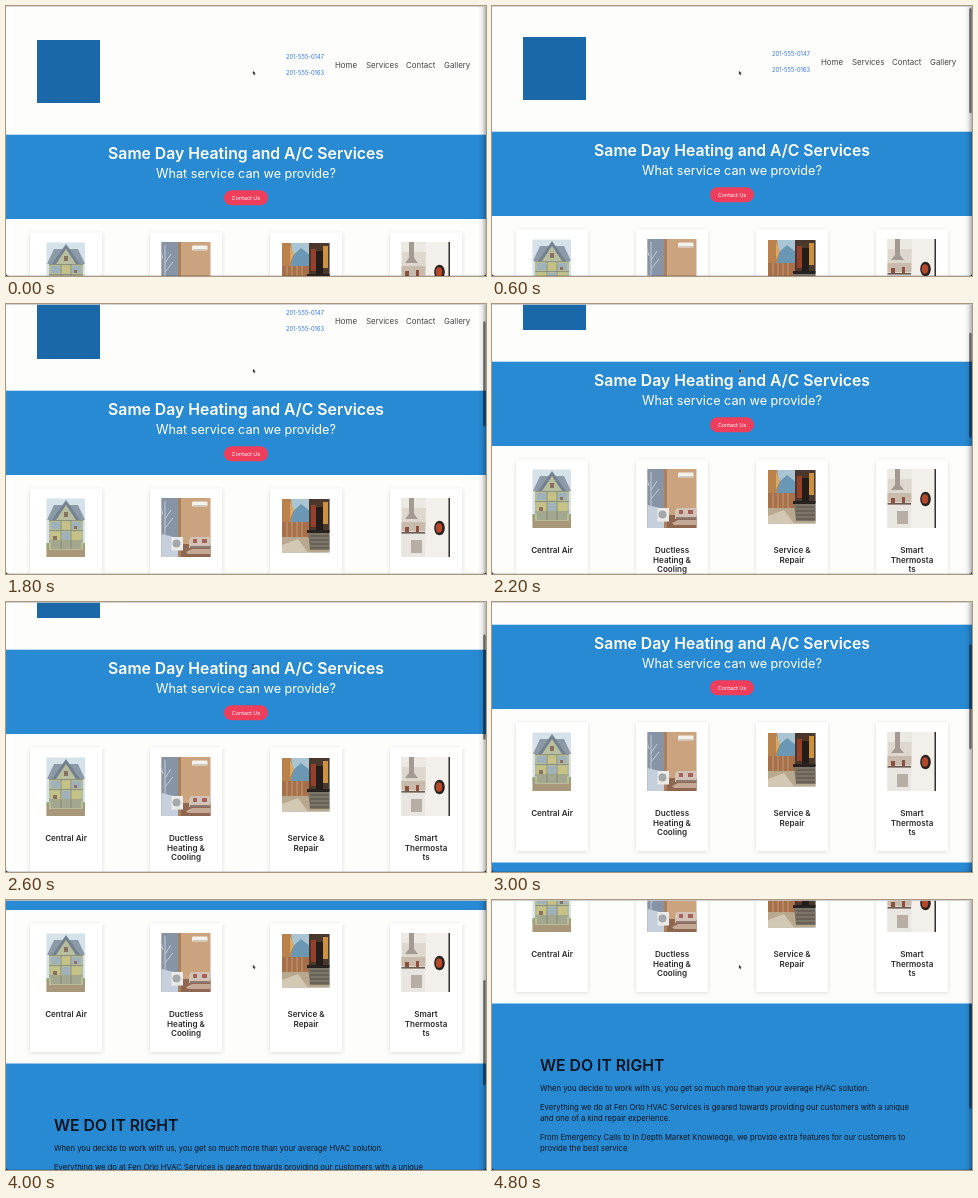
Animation, 480 px wide and 270 px high, one loop 5000 ms. Source, as an HTML page:

```html
<!DOCTYPE html>
<html lang="en">
<head>
<meta charset="utf-8">
<title>Heating and cooling page</title>
<style>
  html, body { margin: 0; width: 100%; height: 100%; overflow: hidden; background: #fdfdfc; }
  svg { display: block; width: 480px; height: 270px; font-family: Inter, Roboto, sans-serif; }
  .mid { text-anchor: middle; }
  .title { font-size: 15.75px; font-weight: 600; }
  .sub { font-size: 12.65px; }
  .phone { font-size: 5.75px; fill: #3273dc; }
  .nav { font-size: 7.9px; fill: #454545; }
  .btn { font-size: 5.4px; }
  .name { font-size: 8.1px; font-weight: 600; fill: #2b2b2b; }
  .copy { font-size: 7.66px; }
  .white { fill: #fff; }
  .ink { fill: #0b1420; }
  .card { fill: #fff; filter: drop-shadow(0 1.8px 2.2px rgba(10, 10, 10, .13)); }
</style>
</head>
<body>
<svg viewBox="0 0 480 270">
  <defs>
    <linearGradient id="edge">
      <stop offset="0" stop-color="#000" stop-opacity="0"/>
      <stop offset=".5" stop-color="#000" stop-opacity=".06"/>
      <stop offset="1" stop-color="#000" stop-opacity=".3"/>
    </linearGradient>
  </defs>
  <rect width="480" height="270" fill="#fdfdfc"/>
  <g id="page">
    <rect x="31" y="34" width="63" height="63" fill="#1a68a8"/>
    <text class="phone" x="280" y="53">201-555-0147</text>
    <text class="phone" x="280" y="69">201-555-0163</text>
    <g id="nav"></g>

    <rect y="128.700" width="480" height="84.300" fill="#288ad3"/>
    <text class="title mid white" x="240" y="153.300">Same Day Heating and A/C Services</text>
    <text class="sub mid white" x="240" y="172">What service can we provide?</text>
    <rect x="218" y="184.300" width="44" height="15" rx="7.500" fill="#ee3e5c"/>
    <text class="btn mid white" x="240" y="193.700">Contact Us</text>

    <g id="cards"></g>

    <!-- house cutaway -->
    <g>
      <rect x="40.500" y="236.500" width="38.500" height="58.500" fill="#d5e2ea"/>
      <path d="M40.500 283H79v12H40.500z" fill="#a9977a"/>
      <path d="M40.500 281H79v4H40.500z" fill="#94a878"/>
      <path d="M43 257h34v31H43z" fill="#b9bd97"/>
      <path d="M41 258l7-15h24l7 15z" fill="#8c99a6"/>
      <path d="M46 258l14-20 14 20z" fill="#74818f"/>
      <path d="M50 258l10-15 10 15z" fill="#b7bfa0"/>
      <path d="M45 260h9v7h-9zM66 260h9v7h-9zM56 270h8v8h-8z" fill="#9fb1bb"/>
      <path d="M56 260h8v7h-8zM45 270h9v8h-9zM66 270h9v8h-9z" fill="#c6c184"/>
      <path d="M45 280h30v7H45z" fill="#a3a78f"/>
      <path d="M43 258.500h34M43 268.500h34M43 279h34M55 259v28m10-28v28" stroke="#7b8270" stroke-width=".7"/>
      <path d="M58 250h4v5h-4zM47 274h4v4h-4zM68 264h3v3h-3z" fill="#8a7263"/>
    </g>

    <!-- living room -->
    <g>
      <rect x="155.500" y="236" width="49" height="59" fill="#cba37f"/>
      <path d="M155.500 236H172v59h-16.500z" fill="#8794a6"/>
      <path d="M155.500 272l16.500 4v19h-16.500z" fill="#c6d0dc"/>
      <path d="M159 277v-38m0 18l6-9m-6 18l8-10m-10-3l-2-7" fill="none" stroke="#c3cdd9" stroke-width="1"/>
      <path d="M172 236h3v59h-3z" fill="#a9815f"/>
      <path d="M175 282h29.500v13H175z" fill="#8f6650"/>
      <path d="M180 290l6-3h18.500v5H182z" fill="#c4a996"/>
      <rect x="186" y="239.500" width="15.500" height="5" rx="1" fill="#f3f1ec"/>
      <path d="M187 243.700h14" stroke="#a8a099" stroke-width=".6"/>
      <path d="M183 278l2-3h19.500v11H183z" fill="#d2c2b8"/>
      <path d="M187 277h4v4h-4zM196 277h5v4h-5z" fill="#a5625a"/>
      <path d="M184 284h20.500v2H184z" fill="#8d7a72"/>
      <rect x="165.500" y="275" width="11.500" height="13.500" fill="#ecebe9"/>
      <circle cx="170.500" cy="281.500" r="4" fill="#a4a8ab"/>
    </g>

    <!-- yard with outdoor unit -->
    <g>
      <rect x="276" y="237" width="47.500" height="53.500" fill="#a9c5d3"/>
      <path d="M285 265v-14l10-9 10 8v15z" fill="#6a98b4"/>
      <path d="M276 237h9l2 14-4 15h-7z" fill="#b9814b"/>
      <path d="M284 239l4 9-4 9z" fill="#d9a863"/>
      <path d="M276 260h28v16h-28z" fill="#a7704a"/>
      <path d="M281 260v16m5-16v16m5-16v16m5-16v16" stroke="#c39a6c" stroke-width="1"/>
      <path d="M276 275h47.500v15.500H276z" fill="#b7a88e"/>
      <path d="M276 283l16-6 10 13.500h-26z" fill="#d3c8b4"/>
      <path d="M303 237h20.500v33H303z" fill="#4a382c"/>
      <path d="M305 243h5v22h-5z" fill="#963f2b"/>
      <path d="M317 240h5v22h-5z" fill="#cf913d"/>
      <path d="M310 245h7v24h-7z" fill="#231d1a"/>
      <path d="M301 268h22.500v3H301z" fill="#27221f"/>
      <path d="M302 271h21.500v17H304z" fill="#7d7468"/>
      <path d="M304 274h19m-19 4h19m-19 4h19m-19 4h19" stroke="#4a443e" stroke-width=".8"/>
    </g>

    <!-- kitchen with round dial -->
    <g>
      <rect x="395.500" y="236" width="48.500" height="59" fill="#ded7cd"/>
      <path d="M395.500 236H420v10h-24.500z" fill="#ece8e2"/>
      <path d="M403 236h5v16l4 5h-13l4-5z" fill="#a39b93"/>
      <path d="M395.500 260H420v9h-24.500z" fill="#c9bbab"/>
      <path d="M395.500 271H420v24h-24.500z" fill="#e9e6e1"/>
      <path d="M395.500 270H419v1.600h-23.500z" fill="#6b5b50"/>
      <path d="M399 265h4v5h-4zM410 264h3v6h-3z" fill="#8c5040"/>
      <path d="M405 278h11v13h-11z" fill="#b7aea5"/>
      <path d="M420 236h22.500v59H419z" fill="#f3f0ec"/>
      <path d="M442.500 236h1.500v59h-1.500z" fill="#38322f"/>
      <ellipse cx="433.500" cy="266" rx="5.300" ry="7.300" fill="#29221f"/>
      <ellipse cx="433" cy="266" rx="3.300" ry="4.800" fill="#b4482b"/>
    </g>

    <rect y="366.500" width="480" height="330" fill="#288ad3"/>
    <text class="title ink" x="48" y="433.800">WE DO IT RIGHT</text>
    <g id="copy"></g>
  </g>

  <rect x="472" width="8" height="270" fill="url(#edge)"/>
  <rect width="480" height=".8" fill="#c8c8c8"/>
  <path d="M0 267Q0 270 3 270H0zM480 267Q480 270 477 270H480z" fill="#1d2630"/>
  <rect y="269.300" width="480" height=".7" fill="#26323d" opacity=".25"/>
  <rect id="thumb" x="477.200" y="1" width="2.400" height="105" rx="1.200" fill="#000" fill-opacity=".5"/>
  <path id="arrow" d="M246.900 64.800v4l1-.9.700 1.500.7-.3-.7-1.500h1.300z" fill="#111" stroke="#fff" stroke-width=".25"/>
  <path id="beam" d="M246 62.600q1.200 0 1.200.8v2.800q0 .8 1.200.8M248.400 62.600q-1.200 0-1.200.8m0 2.800q0 .8-1.200.8" fill="none" stroke="#222" stroke-width=".6"/>
</svg>
<script>
const $ = id => document.getElementById(id);
const text = (cls, x, y, s) => `<text class="${cls}" x="${x}" y="${y}">${s}</text>`;

$('nav').innerHTML = [[329, 'Home'], [360, 'Services'], [400, 'Contact'], [438, 'Gallery']]
  .map(([x, s]) => text('nav', x, 62, s)).join('');

$('cards').innerHTML = [
  ['Central Air'],
  ['Ductless', 'Heating &amp;', 'Cooling'],
  ['Service &amp;', 'Repair'],
  ['Smart', 'Thermosta', 'ts']
].map((lines, i) => {
  const x = 24 + i * 120;
  return `<rect class="card" x="${x}" y="226.5" width="72" height="128.5" rx="1"/>` +
    lines.map((s, n) => text('name mid', x + 36, 320 + n * 9.7, s)).join('');
}).join('');

$('copy').innerHTML = [
  [453.8, 'When you decide to work with us, you get so much more than your average HVAC solution.'],
  [473.4, 'Everything we do at Fen Orlo HVAC Services is geared towards providing our customers with a unique'],
  [483.6, 'and one of a kind repair experience.'],
  [503.3, 'From Emergency Calls to In Depth Market Knowledge, we provide extra features for our customers to'],
  [513.5, 'provide the best service']
].map(([y, s]) => text('copy ink', 48, y, s)).join('');

// Scroll offset for every 200 ms step
const scroll = [0, 0, 0, 3, 9, 13, 13, 24, 40, 42, 56, 71, 74,
  81, 94, 106, 121, 151, 172, 189, 203, 211, 228, 247, 263];
const LOOP = 5000;

function play(id, frame) {
  const steps = scroll.map((s, i) => ({ ...frame(s, i), offset: i / scroll.length, easing: 'step-end' }));
  steps.push({ ...steps[steps.length - 1], offset: 1 });
  $(id).animate(steps, { duration: LOOP, iterations: Infinity }).startTime = 0;
}

const overText = i => i >= 12 && i <= 17;
play('page', s => ({ transform: `translate(0px, ${-s}px)` }));
play('thumb', s => ({ transform: `translate(0px, ${s * 0.39}px)`, opacity: s ? 1 : 0 }));
play('arrow', (s, i) => ({ opacity: overText(i) ? 0 : 1 }));
play('beam', (s, i) => ({ opacity: overText(i) ? 1 : 0 }));
</script>
</body>
</html>
```
